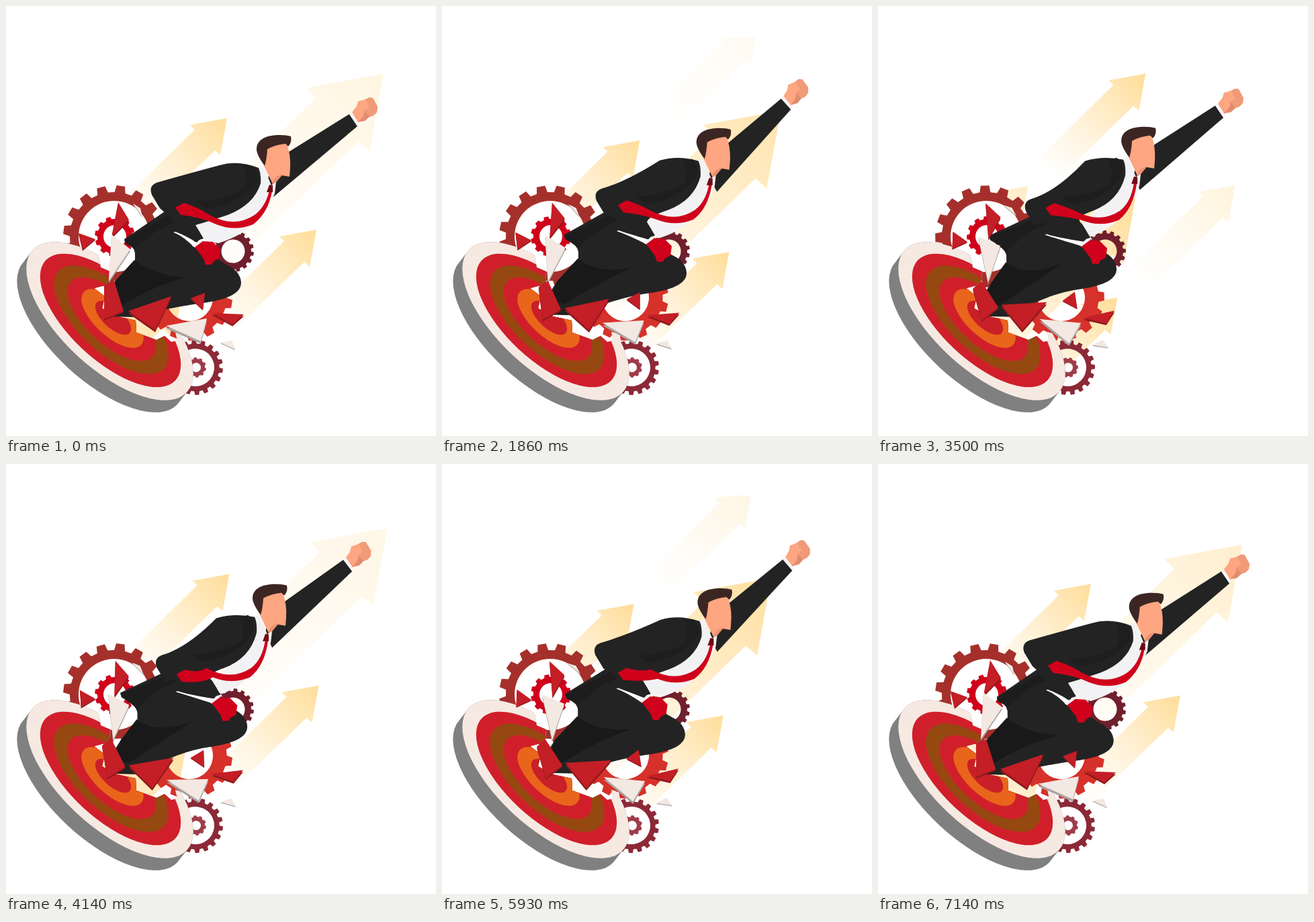
An HTML page that plays this animation: 640 by 640 pixels, repeating every 7.21 s.

```html
<!DOCTYPE html>
<html lang="en">
<head>
<meta charset="utf-8">
<title>Breakthrough</title>
<style>
html, body { margin: 0; width: 100%; height: 100%; overflow: hidden; background: #fff; }
svg { display: block; width: 100vw; height: 100vh; }
</style>
</head>
<body>
<svg viewBox="0 0 640 640">
  <defs>
    <linearGradient id="glow" gradientUnits="userSpaceOnUse" x1="-8" y1="8" x2="-150" y2="146">
      <stop offset="0" stop-color="#ffdf9f"/>
      <stop offset="1" stop-color="#ffe7b8" stop-opacity="0"/>
    </linearGradient>
    <clipPath id="sky"><path d="M-20,300L320,620L640,640V47H0Z"/></clipPath>
    <clipPath id="broken">
      <path d="M0,330H120L138,372L141,389L155,395L154,408L146,416L131,420L147,432L143,450L165,462L193,468L194,486L224,497L236,491L246,500L255,498L252,485L262,488L300,500V640H0Z"/>
    </clipPath>
  </defs>
  <g id="arrows" clip-path="url(#sky)" fill="url(#glow)"></g>
  <g id="gears" fill-rule="evenodd"><circle cx="161" cy="343" r="55" fill="#fff"/></g>
  <g id="target" clip-path="url(#broken)"></g>
  <g id="arm">
    <path fill="#232323" d="M398,234L421,217L511,161L523,179L397,285L388,262Z"/>
    <path fill="#f4f4f6" d="M511,161L515,158L526,176L523,179Z"/>
    <path fill="#fea581" d="M515,158L522,149L524,142L535,139L541,136L546,137L553,150L552,158L547,163L540,165L534,171L524,173Z"/>
    <path fill="#e08d6f" d="M523,172Q533,167 534,155L541,165L534,171Z"/>
    <path fill="#f09a78" d="M535,139L541,136L546,137L553,150L552,158L547,163L541,165L535,155L541,151Z"/>
  </g>
  <g id="body"></g>
  <g id="shards"></g>
</svg>
<script>
const LOOP = 7210, TICK = LOOP / 101, HALF = LOOP / 2;
const BEAT = LOOP / 7, SWAY = LOOP / 3, FLAP = LOOP / 4;
const $ = id => document.getElementById(id);
const clamp = v => Math.max(0, Math.min(1, v));
const wave = x => (1 - Math.cos(2 * Math.PI * x)) / 2;

function add(parent, tag, attrs) {
  const el = document.createElementNS('http://www.w3.org/2000/svg', tag);
  for (const k in attrs) el.setAttribute(k, attrs[k]);
  return parent.appendChild(el);
}

// Arrows: each is a stream of copies, one leaving per beat, that fade in and out
const ARROW = 'M0,0L-55,10L-48,17L-168,134L-138,164L-18,48L-10,55Z';
const arrows = [
  { x: 562, y: 101, size: 2.1, run: 291, from: -340, to: 33, fade: 110 },
  { x: 329, y: 167, size: 1, run: 175, from: -131, to: 150, fade: 65 },
  { x: 462, y: 333, size: 1, run: 175, from: -155, to: 97, fade: 80 }
];
for (const a of arrows)
  a.copies = [0, 1, 2].map(() => add($('arrows'), 'path', { d: ARROW }));

function moveArrows(t) {
  for (const a of arrows) a.copies.forEach((el, i) => {
    const d = a.run * (t / BEAT % 1 - i);
    el.setAttribute('opacity', Math.min(clamp((d - a.from) / 45), clamp((a.to - d) / a.fade)));
    el.setAttribute('transform', `translate(${a.x + d},${a.y - d * .955}) scale(${a.size})`);
  });
}

// Gears: all turn by one tooth per beat
function gear(x, y, r, inner, n, fill) {
  const pts = [], body = r * .87;
  for (let i = 0; i < n; i++)
    for (const [rad, f] of [[body, -.31], [r, -.21], [r, .21], [body, .31]]) {
      const a = (i + f) * 2 * Math.PI / n;
      pts.push([rad * Math.cos(a), rad * Math.sin(a)].map(v => v.toFixed(2)));
    }
  const half = `A${inner},${inner} 0 1 0 `;
  const d = `M${pts.join('L')}ZM${inner},0${half}${-inner},0${half}${inner},0Z`;
  return { x, y, n, el: add($('gears'), 'path', { d, fill }) };
}
const gears = [
  gear(161, 343, 76, 53, 16, '#a5302b'),
  gear(162, 343, 30, 17, 12, '#d0021b'),
  gear(338, 365, 31, 17.5, 16, '#701f2c'),
  gear(273, 434, 64, 35, 14, '#d6312a'),
  gear(282, 538, 41, 28, 18, '#8c2937'),
  gear(283, 538, 15, 7, 10, '#a03c4a')
];

function turnGears(t) {
  for (const g of gears)
    g.el.setAttribute('transform', `translate(${g.x},${g.y}) rotate(${360 / g.n * (1 / 3 - t / BEAT % 1)})`);
}

// Target: rim, then evenly shrinking rings whose centre drifts up and right
const tilt = (x, y) => `translate(${x},${y}) rotate(42.7)`;
add($('target'), 'path', {
  d: 'M-156,0A156,70.6 0 0 1 156,0L158,22.7A156,70.6 0 0 1 -154,22.7Z',
  fill: '#808080', transform: tilt(154.5, 469)
});
['#f6e9e2', '#d01f2a', '#964811', '#d01f2a', '#e9651b', '#c91f28'].forEach((fill, i) => {
  const k = 1 - .157 * i;
  add($('target'), 'ellipse', { rx: 156 * k, ry: 70.6 * k, fill, transform: tilt(154.5 + i, 469 - i) });
});

// Body: the letter after a path point names the joint it follows.
// Each joint eases to its goal while the whole body leans out and back.
const GOALS = {
  head: [-12, -12], shoulder: [-11, -6], elbow: [2, 25], wrist: [21, -1], knee: [4, -20],
  pelvis: [-2, 4], loin: [-12, -5], ankle: [8, 0], tie: [-4, 0], reach: [-9, -11]
};
const DARK = '#232323', WHITE = '#f2f2f4', RED = '#d0021b';
const parts = [];
const part = (fill, shape) => parts.push({ shape, el: add($('body'), 'path', { fill }) });

// legs and coat tail
part(DARK, 'M236,306pL176,347lL178,354lQ190,356p 192,368pL192,384pL160,412aL146,434aL150,462aL190,463aQ240,449k 300,441kQ350,433k 350,412kQ349,395k 330,386kL285,357wL290,330wL262,300pZ');
part('#191919', 'M191,378pQ220,401p 268,404kQ215,418a 172,446aL150,440aL160,412aZ');
part('#1d1d1d', 'M240,312pL176,349lL180,354lL192,362pQ222,332p 250,322pZ');
part('#fff', 'M249,337pQ262,341p 279,358wL284,352wQ266,341p 252,336pZ');

// head
part('#fea581', 'M387,212hQ402,203h 418,205hQ424,222h 423,240hL422,254hL410,252hL398,267hL384,238hZ');
part('#e99173', 'M396,266hQ398,253h 411,251hL410,253hL398,267hZ');
part('#3c2623', 'M385,238hQ372,220h 373,212hC374,196h 392,192h 407,192hQ418,192h 424,194hQ426,203h 420,209hL416,205hQ402,206h 389,213hQ388,228h 385,238hZ');

// shirt, jacket and bent arm
part(WHITE, 'M375,240hL383,238hL395,267hL402,262hL400,279hQ388,312s 352,337sQ336,347s 316,353sL297,349wL281,326wQ330,311s 355,292sQ380,270h 375,240hZ');
part(DARK, 'M376,241hQ345,229s 318,237sQ262,252e 224,263eQ212,268e 217,281eL229,301eL248,318pL281,351wL294,346wL282,326wQ300,321s 330,311sQ369,296s 379,264hQ380,250h 376,241hZ');
part('#1e1e1e', 'M352,237sQ363,255s 354,272sQ325,288s 282,291sL300,302sQ360,290s 375,258hQ374,244h 366,238hZ');
part(WHITE, 'M277,357wL290,347wL294,350wL282,360wZ');
part(RED, 'M281,359wL293,350wL308,351wL319,362wL317,376wL309,380wL306,385wL297,385wL294,376wZ');

// tie
part(RED, 'M392,274hQ387,298s 370,311sQ340,331s 303,311sQ284,299t 265,293tL252,300tL260,311tQ290,314t 313,325sQ341,336s 368,325sQ390,308s 396,276hZ');
part('#700a14', 'M392,266hL397,267hL397,277hL388,277hZ');

function poseMan(t) {
  const u = t < HALF ? t / HALF : 2 - t / HALF;
  const lean = Math.sin(Math.PI * u), ease = wave(u / 2), at = {};
  for (const name in GOALS) {
    const [x, y] = GOALS[name], k = name === 'ankle' ? .6 : 1;
    at[name[0]] = [x * ease + 12 * k * lean, y * ease - 4 * k * lean];
  }
  at.t[1] += 23 * wave(t / FLAP);
  for (const { shape, el } of parts)
    el.setAttribute('d', shape.replace(/(\d+),(\d+)([a-z])/g, (_, x, y, j) =>
      (+x + at[j][0]).toFixed(2) + ',' + (+y + at[j][1]).toFixed(2)));
  $('arm').setAttribute('transform', `translate(${at.r}) rotate(${-8 * lean} 408 250)`);
}

// Shards: a face over a darker edge, rocking about the middle
const STONE = ['#c41e26', '#8c1a1c'], PALE = ['#f3e8e2', '#aaa3a1'];
function shard([face, edge], turn, points) {
  const pts = points.split(' ').map(p => p.split(',').map(Number));
  const [cx, cy] = [0, 1].map(i => pts.reduce((sum, p) => sum + p[i], 0) / pts.length);
  const depth = Math.hypot(pts[0][0] - cx, pts[0][1] - cy) / 10;
  const back = add($('shards'), 'polygon', { points, fill: edge });
  const front = add($('shards'), 'polygon', { points, fill: face });
  return k => {
    const rock = `rotate(${16 * turn * k} ${cx} ${cy})`;
    back.setAttribute('transform', `translate(0,${depth}) ${rock}`);
    front.setAttribute('transform', rock);
  };
}
const shards = [
  shard(STONE, -1, '167,292 183,318 157,344'),
  shard(STONE, 1, '108,338 133,347 114,363'),
  shard(PALE, -1, '157,340 185,362 153,409'),
  shard(PALE, -1, '189,294 200,301 203,314'),
  shard(STONE, -1, '146,417 161,409 175,454 146,466'),
  shard(STONE, 1, '182,454 246,432 222,482'),
  shard(STONE, -1, '275,435 296,427 293,452'),
  shard(PALE, 1, '238,476 299,465 290,499'),
  shard(STONE, -1, '306,457 354,459 337,474'),
  shard(PALE, -1, '319,501 336,498 341,511')
];

function draw(t) {
  moveArrows(t);
  turnGears(t);
  poseMan(t);
  shards.forEach(rock => rock(wave(t / SWAY)));
}

const begin = performance.now();
function frame(now) {
  const t = Math.max(0, now - begin) % LOOP;
  draw(Math.floor(t / TICK + .03) * TICK % LOOP);
  requestAnimationFrame(frame);
}
draw(0);
requestAnimationFrame(frame);
</script>
</body>
</html>
```
